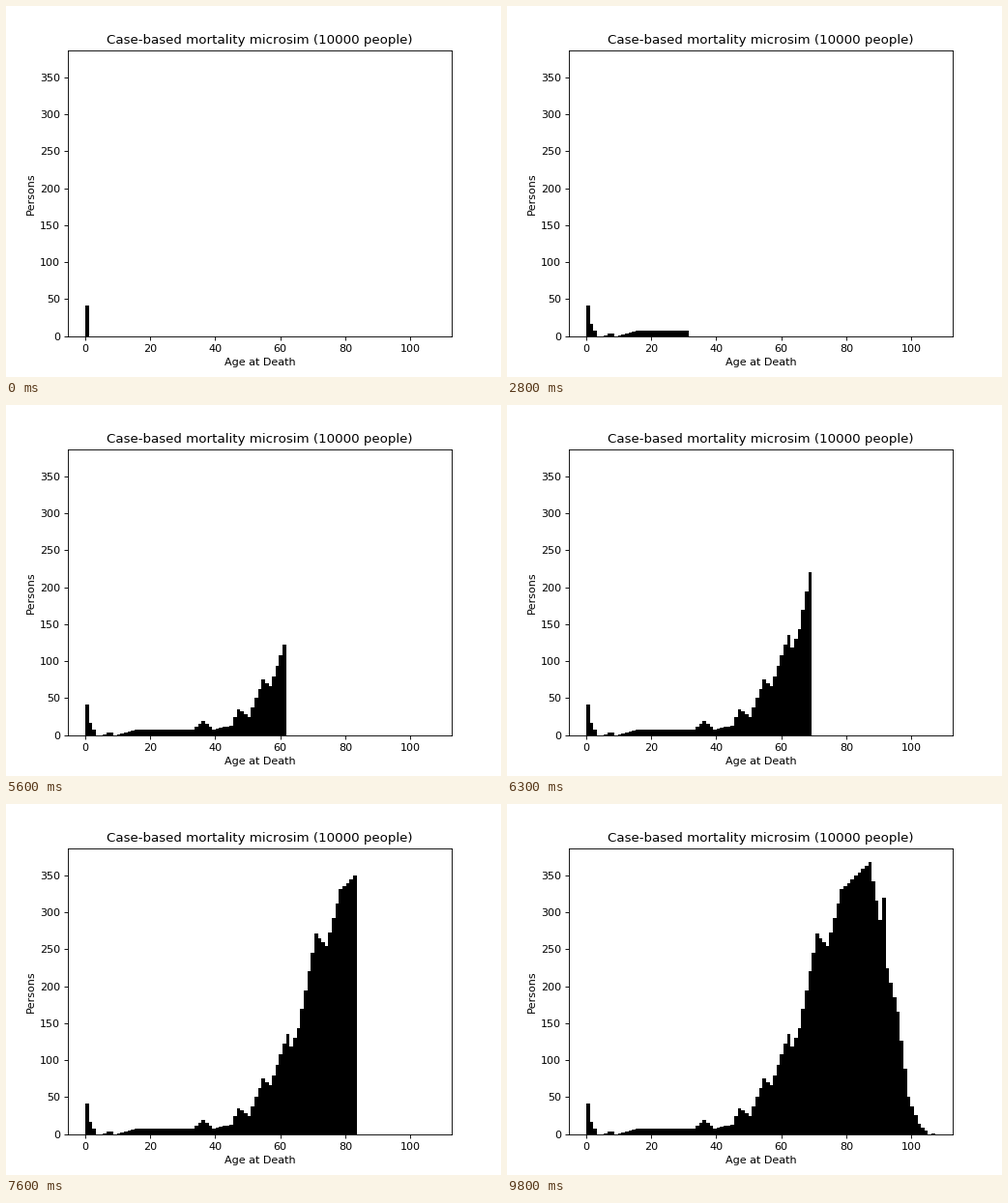
Write a matplotlib script that moves like this. It is 512 px wide and 384 px high and loops after 9.9 s.

```python
import matplotlib.pyplot as plt
import numpy as np
from matplotlib.animation import FuncAnimation

INTERVAL_MS = 100
BINS = 99
OLDEST = 107.36

# Turning points of the death curve: (bin, persons)
INFANCY = [(0, 41), (1, 17), (3, 0), (4, 0), (7, 4), (8, 0)]
ADULTHOOD = [(15, 8), (30, 7), (33, 19), (36, 8), (41, 13), (43, 35), (46, 25)]
RISE = [(50, 75), (52, 66), (57, 136), (58, 119), (60, 143), (65, 271),
        (68, 254), (72, 331), (80, 368)]
DECLINE = [(83, 290), (84, 320), (85, 225), (88, 165), (91, 50), (94, 14),
           (97, 0), (98, 1)]

turn_bins, turn_counts = zip(*INFANCY, *ADULTHOOD, *RISE, *DECLINE)
deaths = np.rint(np.interp(np.arange(BINS), turn_bins, turn_counts))
edges = np.linspace(0, OLDEST, BINS + 1)

plt.rcParams["font.family"] = "DejaVu Sans"
plt.rcParams["text.kerning_factor"] = 6  # kern in whole pixels

fig, ax = plt.subplots(figsize=(6.4, 4.8), dpi=80)
bars = ax.bar(edges[:-1], deaths, width=np.diff(edges), align="edge",
              color="black", linewidth=0)
ax.set_xlim(-0.05 * OLDEST, 1.05 * OLDEST)
ax.set_ylim(0, 1.05 * deaths.max())
ax.set_title("Case-based mortality microsim (10000 people)")
ax.set_xlabel("Age at Death")
ax.set_ylabel("Persons")


def update(frame):
    """Reveal one more age bin per frame."""
    for i, bar in enumerate(bars):
        bar.set_visible(i <= frame and deaths[i] > 0)
    return bars.patches


anim = FuncAnimation(fig, update, frames=BINS, interval=INTERVAL_MS,
                     repeat=True, repeat_delay=0)
plt.show()
```
